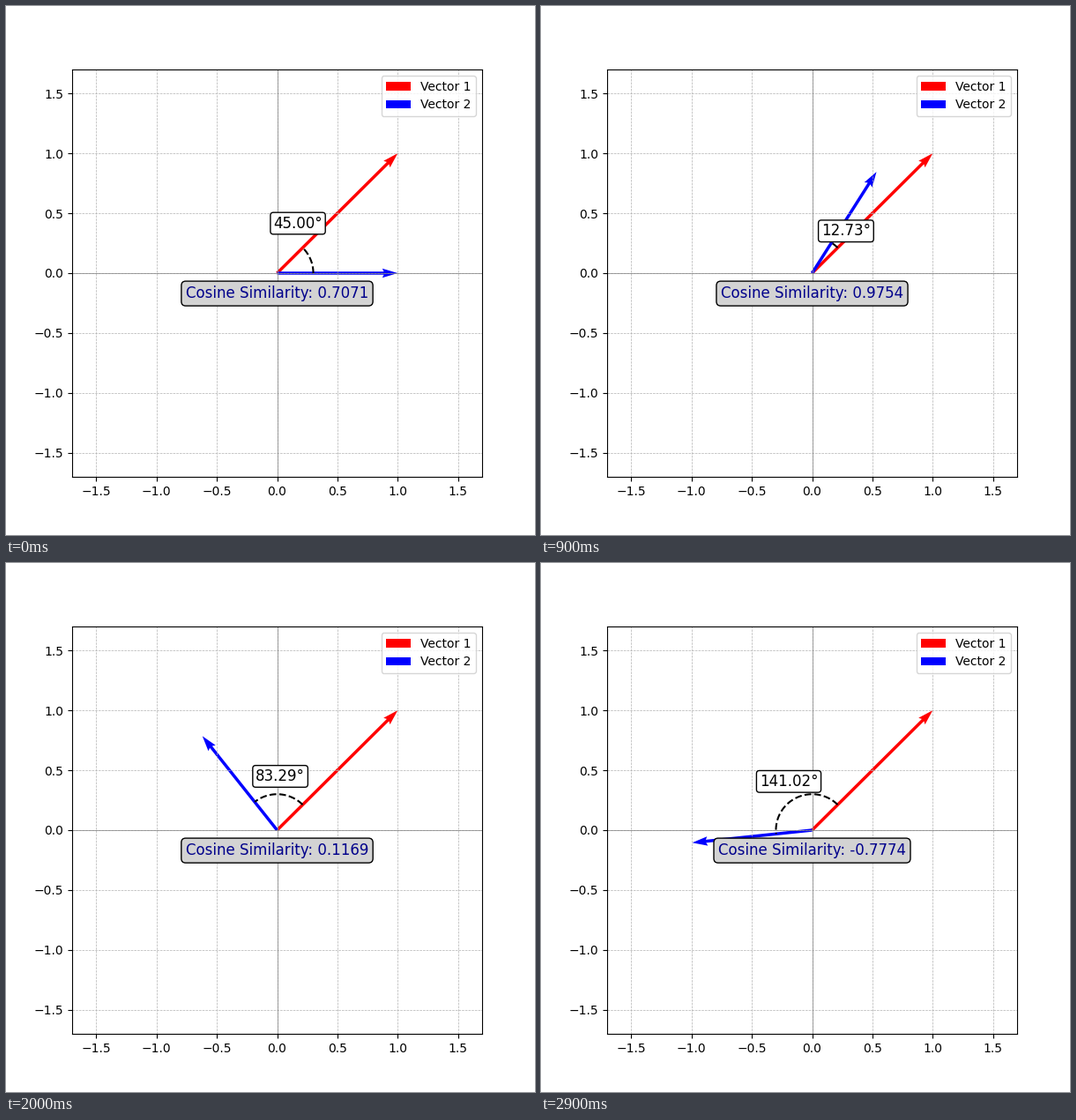
A matplotlib script that plays this animation: 600x600 px, repeating every 3 s.

```python
import numpy as np
import matplotlib.pyplot as plt
from matplotlib.animation import FuncAnimation

FRAMES = 30
INTERVAL = 100           # ms
START = 45               # direction of the fixed vector, degrees
SWEEP = 186.02           # total turn of the moving vector, degrees
LIMIT = 1.7
ARC_RADIUS = 0.3
LABEL_RADIUS = 0.45


def polar(radius, degrees):
    a = np.radians(degrees)
    return radius * np.cos(a), radius * np.sin(a)


def arrow(ax, u, v, color, label):
    return ax.quiver(0, 0, u, v, angles="xy", scale_units="xy", scale=1,
                     color=color, label=label)


def boxed_text(ax, x, y, face, pad, **kwargs):
    box = dict(boxstyle=f"round,pad={pad}", facecolor=face, edgecolor="black")
    return ax.text(x, y, "", fontsize=12, ha="center", va="center",
                   bbox=box, **kwargs)


plt.rcParams["font.family"] = "DejaVu Sans"
fig, ax = plt.subplots(figsize=(6, 6), dpi=100)
ax.set_xlim(-LIMIT, LIMIT)
ax.set_ylim(-LIMIT, LIMIT)
ax.axhline(0, color="gray", linewidth=0.5)
ax.axvline(0, color="gray", linewidth=0.5)
ax.grid(True, linestyle="--", linewidth=0.5)

arrow(ax, 1, 1, "red", "Vector 1")
moving = arrow(ax, 1, 0, "blue", "Vector 2")
arc, = ax.plot([], [], color="black", linestyle="--", linewidth=1.5)
angle_label = boxed_text(ax, 0, 0, "white", 0.2, color="black")
cosine_label = boxed_text(ax, 0.5, 0.45, "lightgray", 0.3, color="darkblue",
                          transform=ax.transAxes)
ax.legend(loc="upper right")


def update(frame):
    heading = SWEEP * frame / (FRAMES - 1)
    between = abs(heading - START)

    moving.set_UVC(*polar(1, heading))
    low, high = sorted((START, heading))
    arc.set_data(*polar(ARC_RADIUS, np.linspace(low, high, 100)))

    angle_label.set_position(polar(LABEL_RADIUS, START + between / 2))
    angle_label.set_text(f"{between:.2f}°")
    cosine = np.cos(np.radians(between))
    cosine_label.set_text(f"Cosine Similarity: {cosine:.4f}")
    return moving, arc, angle_label, cosine_label


anim = FuncAnimation(fig, update, frames=FRAMES, interval=INTERVAL,
                     repeat=True, repeat_delay=0)
plt.show()
```
